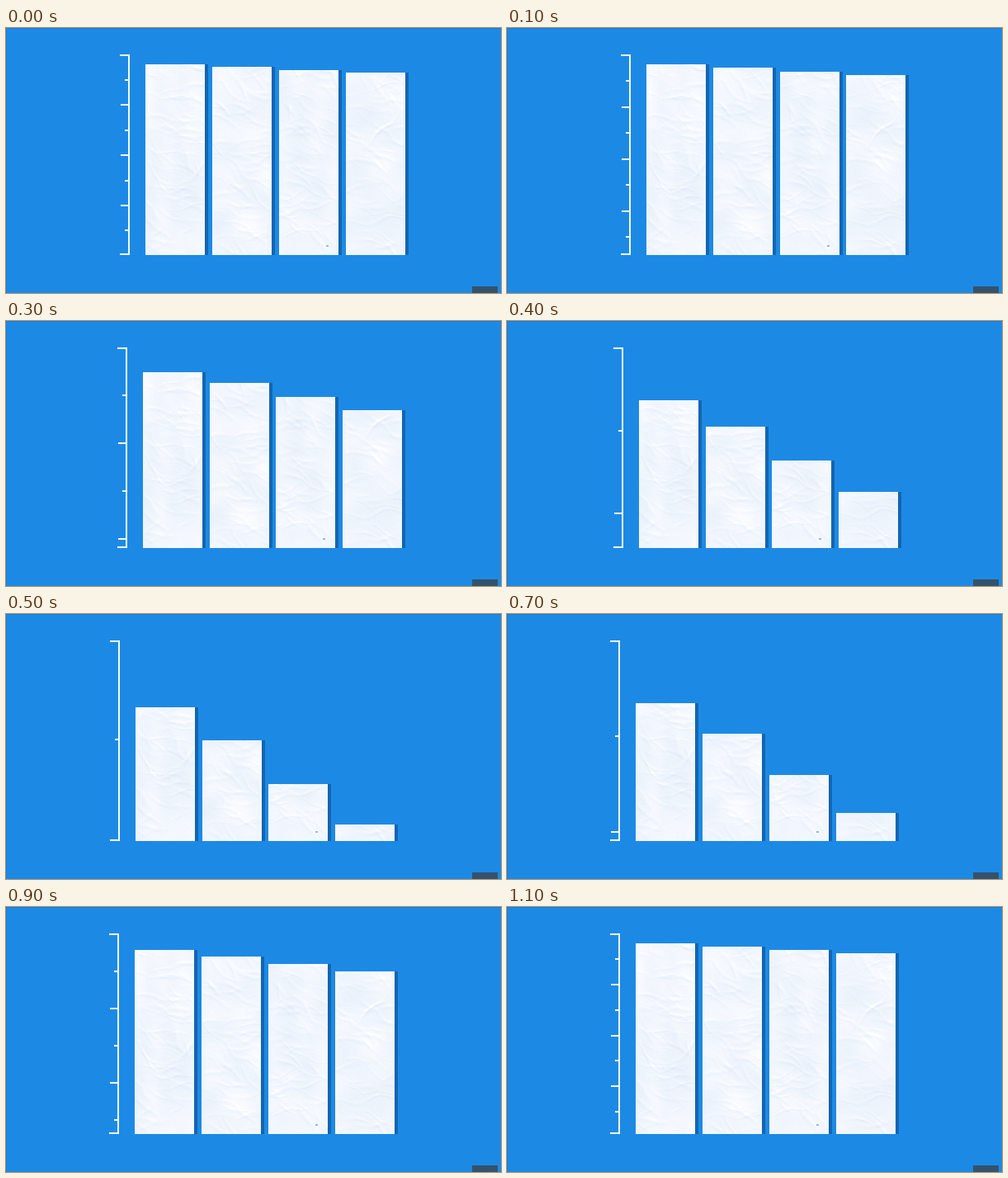
These frames come from a looping animation (600x321 px, 1.2 s). A matplotlib script:

```python
import matplotlib.pyplot as plt
import numpy as np
from matplotlib.animation import FuncAnimation
from matplotlib.collections import LineCollection
from matplotlib.patches import Rectangle

W, H, DPI = 600, 321, 100
BLUE, SHADOW = "#1c8ae4", "#1465b2"
AXIS_TOP, BASE = 33, 274
BOTTOM = 275
BAR_W, BAR_STEP = 72, 80.8
TALL = np.array([43.5, 47, 51, 54.5])           # bar tops, zoomed out
SHORT = np.array([115.9, 157.4, 212.5, 263.4])  # bar tops, zoomed in

# One key per 100 ms: zoom progress and distance between axis ticks
ZOOM = [0, .01, .069, .255, .73, .96, 1, .892, .5, .114, .024, .005]
TICK = [30.4, 31.5, 38.7, 57.8, 100, 119.6, 121, 115.7, 84, 45.1, 33.5, 30.75]


def px(width):
    return width * 72 / DPI


def paper(seed, height=240):
    """Crumpled white paper: soft blotches plus lit creases."""
    rng = np.random.default_rng(seed)
    y, x = np.mgrid[0:height, 0:BAR_W].astype(float)
    shade = np.zeros_like(x)
    for _ in range(14):
        kx, ky = rng.normal(0, .07, 2)
        shade += .12 * np.sin(kx * x + ky * y + rng.uniform(0, 6.3))
    for _ in range(75):
        cx, cy = rng.uniform(0, BAR_W), rng.uniform(0, height)
        angle = rng.normal(.2, .4)
        length, width = rng.uniform(7, 24), rng.uniform(.8, 2)
        u = (x - cx) * np.cos(angle) + (y - cy) * np.sin(angle)
        v = (y - cy) * np.cos(angle) - (x - cx) * np.sin(angle)
        v = (v - 2 * np.sin(u / 7 + cx)) / width
        shade += (rng.uniform(.5, 1.5) * v * np.exp(-v * v / 2)
                  * np.exp(-(u / length) ** 2))
    shade += rng.normal(0, .15, shade.shape) + .5 * y / height
    tone = np.array([244, 248, 254]) - shade[..., None] * np.array([8, 5.5, 2.5])
    return np.clip(tone, 0, 255).astype(np.uint8)


fig = plt.figure(figsize=(W / DPI, H / DPI), dpi=DPI, facecolor=BLUE)
ax = fig.add_axes([0, 0, 1, 1])
ax.axis("off")

sheets = [paper(seed) for seed in (3, 8, 14, 21)]
sheets[2][-12:-10, 57:60] = 150, 185, 220

shadows = [ax.add_patch(Rectangle((0, 0), 3.6, 1, fc=SHADOW, lw=0))
           for _ in sheets]
bars = [ax.imshow(s, aspect="auto", interpolation="nearest", zorder=2)
        for s in sheets]
scale = ax.add_collection(
    LineCollection([], colors="white", linewidths=px(1.9), capstyle="butt"))

for box in ((0, 0, W, 1), (0, 0, 1, H)):
    ax.add_patch(Rectangle(box[:2], *box[2:], fc="#1a7cce", lw=0))
ax.add_patch(Rectangle((565, 312.5), 31, 9, fc="#34526b", lw=0))
ax.set_xlim(0, W)
ax.set_ylim(H, 0)


def axis_lines(x, step):
    def tick(y, length):
        return [(x - length, y), (x, y)]

    lines = [[(x, AXIS_TOP - 1), (x, BASE + 1)],
             tick(AXIS_TOP, 11), tick(BASE, 11)]
    k = 1
    while (y := AXIS_TOP - .4 + k * step) < 268:
        lines.append(tick(y, 4.8 if k % 2 else 10))
        k += 1
    return lines


def update(i):
    zoom = ZOOM[i]
    pan = 13 * (1 - zoom) if i < 6 else 0
    scale.set_segments(axis_lines(136 + pan, TICK[i]))
    tops = TALL + (SHORT - TALL) * zoom
    for k, top in enumerate(tops):
        left = round(156.2 + pan + k * BAR_STEP)
        top = round(top)
        bars[k].set_data(sheets[k][top - BOTTOM:])
        bars[k].set_extent((left, left + BAR_W, BOTTOM, top))
        shadows[k].set_xy((left + BAR_W, top))
        shadows[k].set_height(BOTTOM - top)
    return [scale, *bars, *shadows]


anim = FuncAnimation(fig, update, frames=len(ZOOM), interval=100,
                     repeat=True, repeat_delay=0)
plt.show()
```
